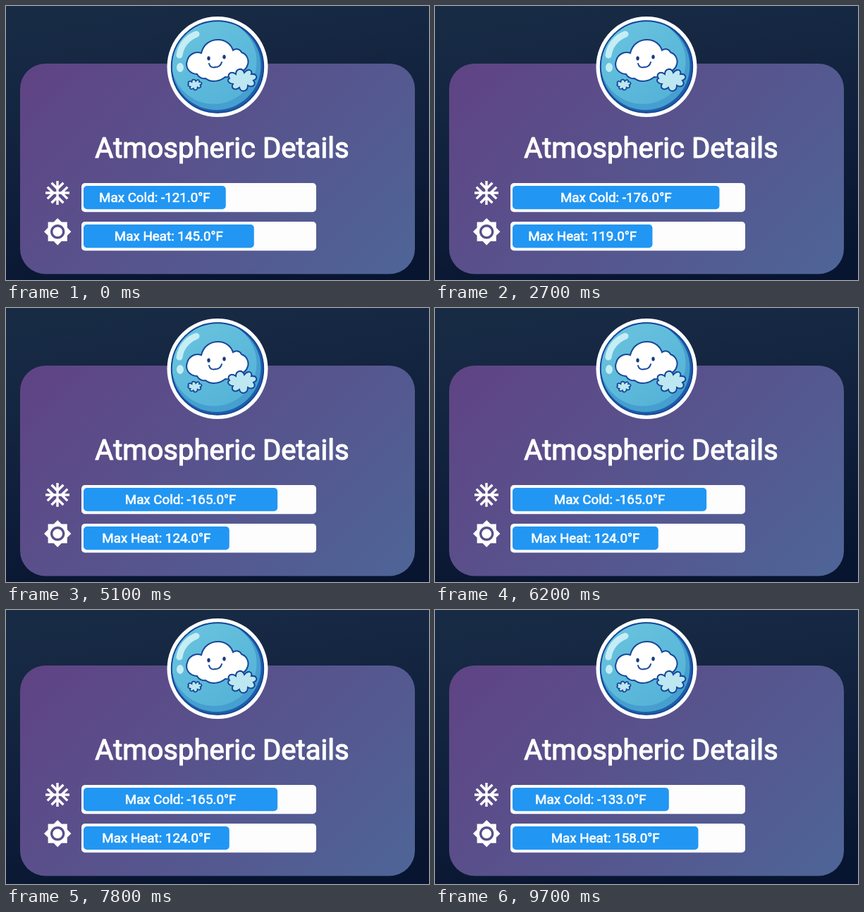
These frames come from a looping animation (600 by 390 pixels, 9800 ms). An HTML page:

```html
<!DOCTYPE html>
<html lang="en">
<head>
<meta charset="utf-8">
<title>Atmospheric Details</title>
<style>
  html, body { margin: 0; width: 100%; height: 100%; overflow: hidden; background: #101f3a; }
  svg { display: block; width: 600px; height: 390px; }
  text {
    font-family: Roboto, Arial, sans-serif;
    text-anchor: middle;
    fill: #fff;
    stroke: #fff;
    stroke-linejoin: round;
  }
  .title { font-size: 40.1px; stroke-width: 1.2px; }
  .label { font-size: 18.8px; stroke-width: .65px; }
  .track { fill: #fdfdfe; }
  .bar { fill: #2196f3; }
  .ink { fill: none; stroke: #17479a; stroke-linecap: round; }
</style>
</head>
<body>
<svg viewBox="0 0 600 390">
  <defs>
    <linearGradient id="sky" x1=".3" y1="0" x2=".55" y2="1">
      <stop offset="0" stop-color="#182b45"/>
      <stop offset=".5" stop-color="#11213d"/>
      <stop offset="1" stop-color="#081531"/>
    </linearGradient>
    <linearGradient id="panel" gradientUnits="userSpaceOnUse" x1="85" y1="17" x2="515" y2="447">
      <stop offset="0" stop-color="#604384"/>
      <stop offset="1" stop-color="#4e6597"/>
    </linearGradient>
    <linearGradient id="glass" x1="0" y1="0" x2=".7" y2="1">
      <stop offset="0" stop-color="#6cc5df"/>
      <stop offset="1" stop-color="#55b3d8"/>
    </linearGradient>
    <clipPath id="ball"><circle cx="300" cy="86.5" r="66"/></clipPath>
    <path id="puff" d="M317 103C313 97 319 92 326 97C326 89 335 87 338 95C343 88 350 91 348 97C356 96 358 103 351 106C356 112 349 117 343 113C343 122 333 124 331 116C325 121 318 117 322 111C315 110 313 105 317 103Z"/>
  </defs>

  <rect width="600" height="390" fill="url(#sky)"/>

  <g id="card">
    <rect x="20" y="82" width="560" height="299.5" rx="36" fill="url(#panel)"/>

    <circle cx="300" cy="86.5" r="71.5" fill="#fff"/>
    <g clip-path="url(#ball)">
      <circle cx="300" cy="86.5" r="66" fill="#1c5fa9"/>
      <circle cx="298.5" cy="85" r="63" fill="#469fcf"/>
      <circle cx="295" cy="79" r="60.5" fill="url(#glass)"/>
      <path d="M246 70C248 56 257 45 270 40" fill="none" stroke="#c5edf5" stroke-width="9" stroke-linecap="round"/>
      <ellipse cx="247" cy="87.5" rx="5" ry="6.5" fill="#c5edf5"/>
    </g>
    <circle cx="300" cy="86.5" r="65.2" class="ink" stroke-width="2"/>

    <path d="M271 97C259 96 254 87 257 78C259 69 268 64 277 67C280 54 290 48 301 48C311 48 319 54 322 63C326 60 332 61 334 66C341 68 345 76 343 83C341 90 336 94 328 94C324 99 318 102 311 101C303 108 290 109 283 103C278 104 273 101 271 97Z" fill="#fff" stroke="#17479a" stroke-width="2"/>
    <g fill="#153b80">
      <ellipse cx="287.5" cy="74.5" rx="2.2" ry="2.9"/>
      <ellipse cx="309.5" cy="72.5" rx="2.2" ry="2.9"/>
    </g>
    <path d="M288 82Q290 89 297 87Q304 87 306 80" class="ink" stroke-width="2"/>
    <use href="#puff" fill="#bde8f1" stroke="#17479a" stroke-width="2"/>
    <use href="#puff" transform="translate(107 61.5) scale(.48)" fill="#bde8f1" stroke="#17479a" stroke-width="3.6"/>

    <text class="title" x="306.5" y="216">Atmospheric Details</text>

    <g fill="#fff">
      <path transform="translate(52.6 245.6) scale(1.7)" d="M22 11h-4.17l3.24-3.24-1.41-1.42L15 11h-2V9l4.66-4.66-1.42-1.41L13 6.17V2h-2v4.17L7.76 2.93 6.34 4.34 11 9v2H9L4.34 6.34 2.93 7.76 6.17 11H2v2h4.17l-3.24 3.24 1.41 1.42L9 13h2v2l-4.66 4.66 1.42 1.41L11 17.83V22h2v-4.17l3.24 3.24 1.42-1.41L13 15v-2h2l4.66 4.66 1.41-1.42L17.83 13H22z"/>
      <path transform="translate(52.8 300.8) scale(1.7)" d="M20 8.69V4h-4.69L12 .69 8.69 4H4v4.69L.69 12 4 15.31V20h4.69L12 23.31 15.31 20H20v-4.69L23.31 12 20 8.69zM12 18c-3.31 0-6-2.69-6-6s2.69-6 6-6 6 2.69 6 6-2.69 6-6 6zm0-10c-2.21 0-4 1.79-4 4s1.79 4 4 4 4-1.79 4-4-1.79-4-4-4z"/>
    </g>

    <rect class="track" x="107" y="252" width="333" height="41.3" rx="5"/>
    <rect class="bar" id="coldBar" x="110" y="256" height="33.3" rx="5"/>
    <text class="label" id="coldText" y="278.7"></text>

    <rect class="track" x="107" y="307" width="333" height="41.3" rx="5"/>
    <rect class="bar" id="heatBar" x="110" y="311" height="33.3" rx="5"/>
    <text class="label" id="heatText" y="333.7"></text>
  </g>
</svg>
<script>
const LOOP = 9800;
const LIFT = { start: 6700, length: 300, y: -3 };
// time in ms, cold, heat
const READINGS = [
  [0, -121, 145],
  [2300, -176, 119],
  [3300, -100, 126],
  [5000, -165, 124],
  [8400, -133, 158]
];
const $ = id => document.getElementById(id);
const card = $('card');

function meter(name, title) {
  const bar = $(name + 'Bar'), label = $(name + 'Text');
  return value => {
    const width = Math.abs(value) / 200 * 333.5;
    bar.setAttribute('width', width);
    label.setAttribute('x', 110 + width / 2);
    label.textContent = `${title}: ${value.toFixed(1)}°F`;
  };
}
const showCold = meter('cold', 'Max Cold');
const showHeat = meter('heat', 'Max Heat');
const smooth = p => p * p * (3 - 2 * p);
let shown;

function draw(t) {
  const row = READINGS.findLast(r => r[0] <= t);
  if (row !== shown) {
    shown = row;
    showCold(row[1]);
    showHeat(row[2]);
  }
  const p = Math.min(1, Math.max(0, (t - LIFT.start) / LIFT.length));
  card.setAttribute('transform', `translate(0 ${LIFT.y * smooth(p)})`);
}

const begin = performance.now();
function tick() {
  draw((performance.now() - begin) % LOOP);
  requestAnimationFrame(tick);
}
tick();
</script>
</body>
</html>
```
